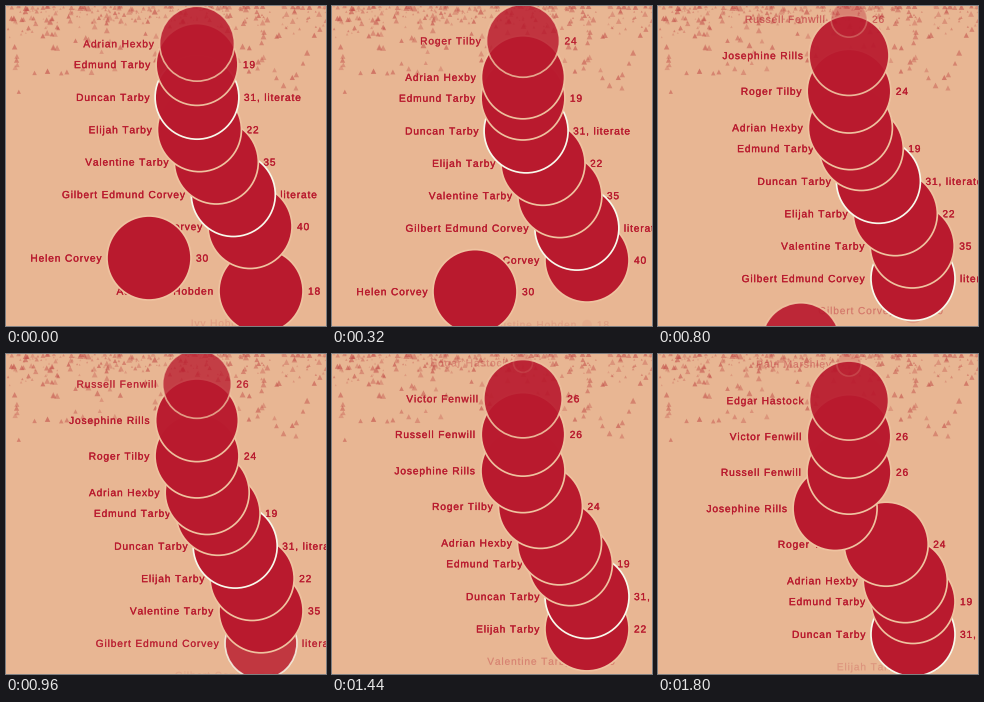
These frames come from a looping animation (320x320 px, 1840 ms). A matplotlib script:

```python
import numpy as np
import matplotlib.pyplot as plt
from matplotlib.animation import FuncAnimation
from matplotlib.patches import Circle
from matplotlib.patheffects import withStroke

SIZE, DPI = 320, 100
PX = 72 / DPI                  # points per pixel
FRAMES, INTERVAL = 46, 40
SPEED = 4.2                    # pixels per frame
RADIUS, EASE = 42, 14.7
TOP_X, LEFT, RIGHT = 191, 143, 255
ENTER_Y, EXIT_Y = 5, {LEFT: 335, RIGHT: 287}

TAN, RED = "#e8b693", "#b91a2e"
CREAM, WHITE = "#efc3a0", "#f7faec"
HAIR_SPACE = "\u200a"

# name, note, starting height, column
PEOPLE = [
    ("Ivy Hobden", "", 317, RIGHT),
    ("Augustine Hobden", "18", 285, RIGHT),
    ("Helen Corvey", "30", 252, LEFT),
    ("Gilbert Corvey", "40", 220.5, RIGHT),
    ("Gilbert Edmund Corvey", "literate", 188.5, RIGHT),
    ("Valentine Tarby", "35", 156, RIGHT),
    ("Elijah Tarby", "22", 123.7, RIGHT),
    ("Duncan Tarby", "31, literate", 91.3, RIGHT),
    ("Edmund Tarby", "19", 58.5, RIGHT),
    ("Adrian Hexby", "", 37.7, RIGHT),
    ("Roger Tilby", "24", 1.2, RIGHT),
    ("Josephine Rills", "", -34.5, LEFT),
    ("Russell Fenwill", "26", -70.8, RIGHT),
    ("Victor Fenwill", "26", -106.5, RIGHT),
    ("Edgar Hastock", "", -142.4, RIGHT),
    ("Paul Marshley", "", -179, RIGHT),
]

fig = plt.figure(figsize=(SIZE / DPI, SIZE / DPI), dpi=DPI, facecolor=TAN)
ax = fig.add_axes([0, 0, 1, 1])
ax.set_xlim(0, SIZE)
ax.set_ylim(SIZE, 0)
ax.axis("off")


def scatter_triangles(count, depth, power, size, alpha, rng):
    x = rng.uniform(0, SIZE, count)
    edge = 0.55 + 0.45 * np.abs(x / SIZE - 0.5) * 2
    y = depth * edge * rng.random(count) ** power
    s = (rng.uniform(*size, count) * PX) ** 2
    ax.scatter(x, y, s=s, marker="^", color="#c4524c", linewidths=0,
               alpha=rng.uniform(*alpha, count), zorder=1)


rng = np.random.default_rng(11)
scatter_triangles(190, 95, 2.0, (4, 6), (0.3, 0.65), rng)
scatter_triangles(160, 32, 1.6, (1.5, 3), (0.2, 0.5), rng)


def label(text, side):
    return ax.text(0, 0, HAIR_SPACE.join(text), ha=side, va="baseline", color=RED,
                   family=["Liberation Sans", "DejaVu Sans"], size=10.2 * PX, zorder=2,
                   path_effects=[withStroke(linewidth=0.25 * PX, foreground=RED)])


class Person:
    def __init__(self, order, name, note, start, column):
        self.start, self.column = start, column
        ring = WHITE if "literate" in note else CREAM
        self.disc = ax.add_patch(Circle((0, 0), RADIUS, facecolor=RED, edgecolor=ring,
                                        linewidth=1.7 * PX, zorder=3 + order))
        self.name, self.note = label(name, "right"), label(note, "left")

    def place(self, frame):
        y = self.start + SPEED * frame
        x = np.interp(y, [119, 241.5], [TOP_X, self.column])
        grow = 1 - np.exp(-max(y - ENTER_Y, 0) / EASE)
        shrink = np.exp(-max(y - EXIT_Y[self.column], 0) / EASE)
        scale = grow * shrink
        r = RADIUS * scale
        self.disc.set_center((x, y))
        self.disc.set_radius(r)
        self.name.set_position((x - r - 5, y + 3.6))
        self.note.set_position((x + r + 5, y + 3.6))
        for artist in (self.disc, self.name, self.note):
            artist.set_visible(scale > 0.02)
            artist.set_alpha(float(scale ** 1.3))


people = [Person(i, *row) for i, row in enumerate(PEOPLE)]


def update(frame):
    for person in people:
        person.place(frame)
    return []


anim = FuncAnimation(fig, update, frames=FRAMES, interval=INTERVAL,
                     repeat=True, repeat_delay=0, blit=False)
plt.show()
```
